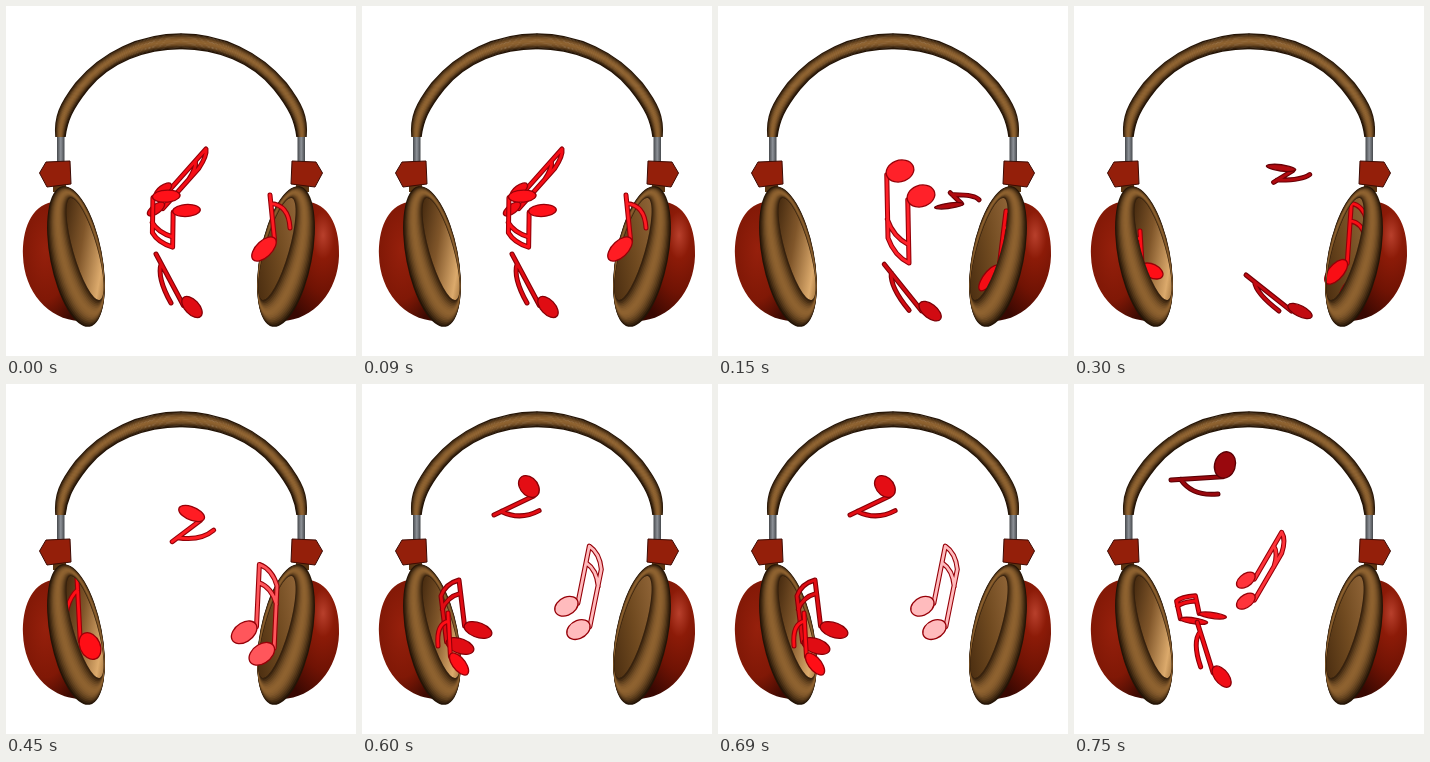
Recreate the animation shown at these times as an HTML page. Size 350x350 px, loop 900 ms.

```html
<!DOCTYPE html>
<html lang="en">
<head>
<meta charset="utf-8">
<title>Headphones and notes</title>
<style>
  html, body { margin: 0; width: 100%; height: 100%; overflow: hidden; background: #fff; }
  svg { display: block; width: 100vw; height: 100vh; }
  .left { --cup: url(#cupLeft); --bowl: url(#bowlLeft); }
  .right { --cup: url(#cupRight); --bowl: url(#bowlRight); }
  .note * { vector-effect: non-scaling-stroke; }
  .note path { fill: none; stroke-linecap: round; stroke-linejoin: round; }
</style>
</head>
<body>
<svg viewBox="0 0 350 350">
  <defs>
    <radialGradient id="cupLeft" cx=".4" cy=".4" r=".7">
      <stop stop-color="#96200c"/><stop offset=".6" stop-color="#801806"/><stop offset="1" stop-color="#3c0a02"/>
    </radialGradient>
    <radialGradient id="cupRight" cx=".28" cy=".28" r=".8">
      <stop stop-color="#b8402c"/><stop offset=".25" stop-color="#8c1b08"/><stop offset=".6" stop-color="#701304"/><stop offset="1" stop-color="#380802"/>
    </radialGradient>
    <linearGradient id="bowlLeft" x1=".2" y1="0" x2=".7" y2="1">
      <stop stop-color="#3c230b"/><stop offset=".45" stop-color="#80562a"/><stop offset=".85" stop-color="#dcaa6c"/><stop offset="1" stop-color="#a0723c"/>
    </linearGradient>
    <linearGradient id="bowlRight" x1=".2" y1="0" x2=".7" y2="1">
      <stop stop-color="#94683a"/><stop offset=".5" stop-color="#704a20"/><stop offset="1" stop-color="#4a2d10"/>
    </linearGradient>
    <linearGradient id="rod">
      <stop stop-color="#45484c"/><stop offset=".5" stop-color="#8e9298"/><stop offset="1" stop-color="#45484c"/>
    </linearGradient>
    <mask id="hollow" maskUnits="userSpaceOnUse" x="0" y="150" width="130" height="200">
      <path fill="#fff" d="M0 150h130v200H0z"/>
      <ellipse cx="79" cy="243" rx="12" ry="53" transform="rotate(-16 79 243)"/>
    </mask>
    <g id="back">
      <path fill="url(#rod)" d="M51 128h7.500v30H51z"/>
      <path fill="#5a3714" d="M47 178h13v8H47z"/>
      <path fill="#941f0a" stroke="#3c0a03" d="M40 156L64 155 65 178 41 181 33.500 167z"/>
      <path fill="var(--cup)" d="M46 196C25 200 16 224 17 250C18 285 42 314 74 315Z"/>
      <ellipse cx="79" cy="243" rx="13" ry="54" transform="rotate(-16 79 243)" fill="var(--bowl)"/>
    </g>
    <g id="ring" mask="url(#hollow)"></g>
    <g id="band"></g>
  </defs>
  <use href="#back" class="left"/>
  <use href="#back" class="right" transform="matrix(-1 0 0 1 350 0)"/>
  <use href="#band"/>
  <use href="#band" transform="matrix(-1 0 0 1 350 0)"/>
  <g id="inside"></g>
  <use href="#ring"/>
  <use href="#ring" transform="matrix(-1 0 0 1 350 0)"/>
  <g id="outside"></g>
</svg>
<script>
const $ = id => document.getElementById(id);
const mix = (a, b, t) => a + (b - a) * t;
const blend = (p, q, t) => p.map((v, i) => mix(v, q[i], t));
const rgb = color => `rgb(${color.map(Math.round)})`;

// Rounded surfaces: nested shapes, darkest at the rims.
const brown = t => rgb(blend([36, 20, 6], [142, 98, 48], Math.sin(Math.PI * t)));
const STEPS = 18;
const outerArc = [50, 131, 48, 111, 54, 98, 70, 77, 96, 46, 134, 28, 175.3, 28];
const innerArc = [59, 131, 61, 115, 66, 103, 82, 83, 104, 56, 139, 42.5, 175.3, 42.5];
for (let i = 0; i < STEPS; i++) {
  const t = i / (STEPS - 1);
  const [x, y, rx, ry, tilt] = blend([70, 250.5, 26, 71.5, -11], [79, 243, 12, 53, -16], t);
  $('ring').innerHTML += `<ellipse cx="${x}" cy="${y}" rx="${rx}" ry="${ry}" transform="rotate(${tilt} ${x} ${y})" fill="${brown(t)}"/>`;
  const [startX, startY, ...curve] = blend(outerArc, innerArc, t);
  $('band').innerHTML += `<path d="M${startX} ${startY}C${curve}" fill="none" stroke="${brown(t)}" stroke-width="1.4"/>`;
}

// Flat note models. Anchors: stem tip, and the flag's end or the second head; the first head is at 0,0.
const head = (x, y) => `<ellipse rx="13" ry="9.5" transform="translate(${x} ${y}) rotate(-25)"/>`;
const single = {
  anchors: [11, -52, 27, -10],
  lines: 'M11 -4V-52M11 -43Q28 -34 27 -10',
  heads: head(0, 0)
};
const pair = {
  anchors: [13, -62, 18, 22],
  lines: 'M12 -4L13 -62q13 6 18 22L30 18M13 -45q13 6 18 22',
  heads: head(0, 0) + head(18, 22)
};

// A pose is [head, tip, flag end or second head] as x, y pairs; find the matrix that puts the model there.
function matrix([hx, hy, tx, ty, ex, ey], [a, b, c, d]) {
  const det = a * d - b * c;
  const axes = [[tx - hx, ex - hx], [ty - hy, ey - hy]]
    .map(([u, v]) => [(u * d - v * b) / det, (v * a - u * c) / det]);
  return [axes[0][0], axes[1][0], axes[0][1], axes[1][1], hx, hy];
}

// Shade: 0 is black, .5 pure red, 1 white.
const tone = (color, shade) => shade < .5 ? color.map(v => v * shade * 2) : blend(color, [255, 255, 255], shade * 2 - 1);

function drawNote({ anchors, lines, heads }, pose, shade) {
  const face = rgb(tone([255, 14, 22], shade));
  const edge = rgb(tone([150, 0, 8], Math.min(shade, .5)));
  return `<g class="note" transform="matrix(${matrix(pose, anchors)})" fill="${face}" stroke="${edge}" stroke-width="1.3">
    <path d="${lines}" stroke-width="5"/><path d="${lines}" stroke="${face}" stroke-width="2.8"/>${heads}</g>`;
}

// Each flight starts at a beat and lasts some beats; it stays inside the cup for the first `hidden` of them.
const linear = s => s;
const smooth = s => s * s * (3 - 2 * s);
const flights = [
  { model: single, start: 2, beats: 2, hidden: 2, ease: linear,
    from: [78, 265, 66, 225, 54, 255], to: [84, 262, 71, 194, 60, 250],
    shade: () => .5 },
  { model: pair, start: 1, beats: 6, hidden: 2, ease: smooth,
    from: [271, 272, 288, 205, 283, 285], via: [222, 236, 240, 171, 238, 259], to: [157, 184, 200, 143, 150, 203],
    shade: s => .48 + .38 * Math.sin(Math.PI * s ** 1.3) ** 4 },
  { model: pair, start: 4, beats: 4, hidden: 0, ease: smooth,
    from: [116, 246, 97, 196, 98, 262], to: [203, 190, 191, 257, 182, 165],
    shade: s => .44 + .1 * s },
  { model: single, start: 4, beats: 5, hidden: 0, ease: linear,
    from: [97, 280, 86, 229, 76, 262], via: [186, 301, 150, 248, 165, 297], to: [226, 305, 172, 269, 205, 305],
    shade: s => .5 - .12 * s },
  { model: single, start: 0, beats: 6, hidden: 0, ease: linear,
    from: [258, 243, 264, 189, 284, 222], via: [196, 145, 183, 168, 222, 157], to: [151, 81, 97, 96, 144, 110],
    shade: s => .42 - .12 * Math.cos(2 * Math.PI * (s - .3) / .7) }
];

// Parabola through from, via and to.
const along = ({ from, to, via = blend(from, to, .5) }, s) =>
  from.map((p, i) => 2 * (s - .5) * (s - 1) * p + 4 * s * (1 - s) * via[i] + 2 * s * (s - .5) * to[i]);

const BEAT = 150, BEATS = 6;
let shown = -1;
function draw() {
  const beat = Math.floor(performance.now() / BEAT) % BEATS;
  if (beat !== shown) {
    const layers = { inside: '', outside: '' };
    for (const flight of flights) {
      const age = (beat - flight.start + BEATS) % BEATS;
      if (age >= flight.beats) continue;
      const s = age / (flight.beats - 1);
      layers[age < flight.hidden ? 'inside' : 'outside'] +=
        drawNote(flight.model, along(flight, flight.ease(s)), flight.shade(s));
    }
    for (const layer in layers) $(layer).innerHTML = layers[layer];
    shown = beat;
  }
  requestAnimationFrame(draw);
}
draw();
</script>
</body>
</html>
```
